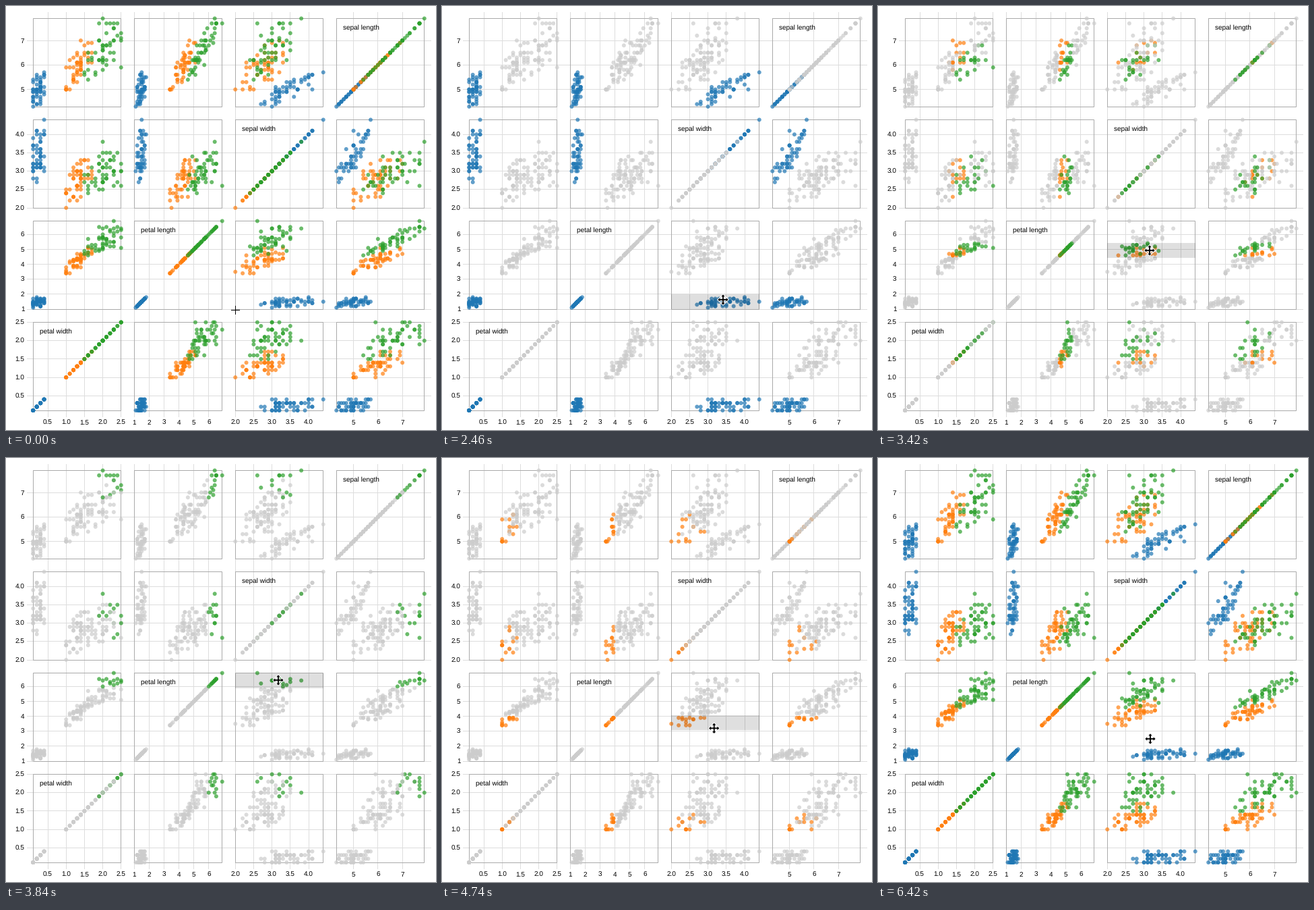
A matplotlib script that plays this animation: 638x628 px, repeating every 6.48 s.

```python
import numpy as np
import matplotlib.pyplot as plt
from matplotlib.animation import FuncAnimation
from matplotlib.patches import Polygon, Rectangle

plt.rcParams["text.hinting"] = "none"

W, H, DPI = 638, 628, 100
PX = 72 / DPI
FRAMES, STEP = 108, 60
PITCH, SIDE = 150, 130.5
LEFT, TOP = 40.25, 18.5

NAMES = ["sepal length", "sepal width", "petal length", "petal width"]
LOW = np.array([4.3, 2.0, 1.0, 0.1])
HIGH = np.array([7.9, 4.4, 6.9, 2.5])
TICK_GAP = [1, 0.5, 1, 0.5]
GREY = "#cccccc"

# colour, mean, spread, pull of overall size on each trait, two extreme flowers
SPECIES = [
    ("#1f77b4", (5.0, 3.43, 1.46, 0.25), (0.35, 0.38, 0.17, 0.10),
     (0.9, 0.82, 0.3, 0.3), [(4.3, 3.0, 1.1, 0.1), (5.7, 4.4, 1.5, 0.4)]),
    ("#ff7f0e", (5.94, 2.77, 4.26, 1.33), (0.52, 0.31, 0.47, 0.20),
     (0.75, 0.7, 0.9, 0.85), [(5.0, 2.0, 3.5, 1.0), (7.0, 3.2, 4.7, 1.4)]),
    ("#2ca02c", (6.59, 2.97, 5.55, 2.03), (0.64, 0.32, 0.55, 0.27),
     (0.9, 0.55, 0.95, 0.45), [(7.9, 3.8, 6.4, 2.0), (7.7, 2.6, 6.9, 2.3)]),
]
COUNT = 50


def flowers(rng, mean, spread, pull, extremes):
    """Traits that share one size factor, measured to 0.1."""
    pull = np.array(pull)
    n = COUNT - len(extremes)
    z = pull * rng.standard_normal((n, 1))
    z = z + np.sqrt(1 - pull ** 2) * rng.standard_normal((n, 4))
    z = np.clip((z - z.mean(0)) / z.std(0), -1.8, 1.8)
    return np.vstack([extremes, np.round(mean + spread * z, 1)])


rng = np.random.default_rng(7)
data = np.vstack([flowers(rng, *s[1:]) for s in SPECIES])


def x_pos(v, k):
    return LEFT + PITCH * (3 - k) + (v - LOW[k]) / (HIGH[k] - LOW[k]) * SIDE


def y_pos(v, k):
    return TOP + PITCH * k + (HIGH[k] - v) / (HIGH[k] - LOW[k]) * SIDE


def crisp(v):
    return np.floor(v) + 0.5


def rgba(color):
    return [int(color[i:i + 2], 16) / 255 for i in (1, 3, 5)] + [0.7]


fig = plt.figure(figsize=(W / DPI, H / DPI), dpi=DPI, facecolor="white")
ax = fig.add_axes([0, 0, 1, 1])
ax.set_xlim(0, W)
ax.set_ylim(H, 0)
ax.axis("off")
FONT = dict(family="Liberation Sans", size=10 * PX, color="black", va="baseline")
GRID = dict(color="#dddddd", lw=PX, zorder=1, solid_capstyle="butt", snap=False)

# Grid, tick labels, trait names
for k, gap in enumerate(TICK_GAP):
    first = np.ceil(LOW[k] / gap) * gap
    for v in np.arange(first, HIGH[k] + 0.01, gap):
        x, y = x_pos(v, k), y_pos(v, k)
        ax.plot([crisp(x)] * 2, [9, 609], **GRID)
        ax.plot([31, 631], [crisp(y)] * 2, **GRID)
        label = f"{v:.0f}" if gap == 1 else f"{v:.1f}"
        ax.text(x, 619.5, label, ha="center", **FONT)
        ax.text(27.5, y + 3.5, label, ha="right", **FONT)
    ax.text(LEFT + PITCH * (3 - k) + 9.75, 35 + PITCH * k, NAMES[k],
            ha="left", zorder=5, **FONT)

for row in range(4):
    for col in range(4):
        ax.add_patch(Rectangle((40.5 + PITCH * col, 18.5 + PITCH * row), 130, 131,
                               fill=False, ec="#aaaaaa", lw=PX, zorder=2,
                               snap=False))

cells = [(kx, ky) for kx in range(4) for ky in range(4)]
dots = ax.scatter(np.concatenate([x_pos(data[:, kx], kx) for kx, _ in cells]),
                  np.concatenate([y_pos(data[:, ky], ky) for _, ky in cells]),
                  s=(6 * PX) ** 2, linewidths=0, zorder=3)
full = np.repeat([rgba(s[0]) for s in SPECIES], COUNT, axis=0)

# The brush lives in the sepal width / petal length cell
bx, by = x_pos(data[:, 1], 1), y_pos(data[:, 2], 2)
B_LEFT, B_TOP = LEFT + 2 * PITCH, TOP + 2 * PITCH
B_RIGHT, B_BOTTOM = B_LEFT + SIDE, B_TOP + SIDE
DEPTH = 22
brush = ax.add_patch(Rectangle((0, 0), 1, 1, fc="black", alpha=0.125, lw=0,
                               zorder=4))

arm = np.array([(-1.4, -1.4), (-1.4, -4.2), (-3.9, -4.2),
                (0, -8.4), (3.9, -4.2), (1.4, -4.2)])
turn = np.array([[0, 1], [-1, 0]])
ARROWS = np.vstack([arm @ np.linalg.matrix_power(turn, q) for q in range(4)])
CROSS = np.array([(-6.5, 0), (6.5, 0), (np.nan, np.nan), (0, -6.5), (0, 6.5)])
mover = ax.add_patch(Polygon(ARROWS, fc="black", ec="white", lw=PX, zorder=6))
cross, = ax.plot([], [], color="black", lw=PX, zorder=6,
                 solid_capstyle="butt", snap=False)

# Pointer path: ms, x, y
PATH = np.array([
    (720, 340, 450.5), (1560, 476, 442), (1980, 473, 427), (2460, 417, 435),
    (2580, 416, 438), (3420, 403, 362), (3840, 404, 329), (4080, 405, 329),
    (4380, 405, 366), (5220, 402, 446), (5460, 402, 443), (6420, 404, 416)])
PRESS, RELEASE, GRAB, REGRAB, DROP, CLEAR = 780, 1980, 2580, 3840, 5220, 6060


def pointer(t):
    return [np.interp(t, PATH[:, 0], PATH[:, k]) for k in (1, 2)]


def extent(t):
    """Brush as left, right, top, bottom, or None while empty."""
    if t < PRESS or t >= CLEAR:
        return None
    if t < RELEASE:
        x, y = pointer(t)
        top = np.clip(y, B_TOP, B_BOTTOM)
        return (B_LEFT, min(x, B_RIGHT), top, B_BOTTOM) if top < B_BOTTOM else None
    grip = 11 if t < REGRAB else 19
    y = pointer(np.clip(t, GRAB, DROP))[1]
    top = np.clip(y - grip, B_TOP, B_BOTTOM - DEPTH)
    return B_LEFT, B_RIGHT, top, top + DEPTH


def draw(i):
    t = i * STEP
    box = extent(t)
    colors = full
    brush.set_visible(box is not None)
    if box:
        x0, x1, y0, y1 = box
        brush.set_bounds(x0, y0, x1 - x0, y1 - y0)
        inside = (bx <= x1 + 0.01) & (by >= y0 - 0.01) & (by <= y1 + 0.01)
        colors = np.where(inside[:, None], full, rgba(GREY))
    dots.set_facecolors(np.tile(colors, (len(cells), 1)))

    x, y = pointer(t)
    moving = t > RELEASE + STEP
    mover.set_visible(moving)
    cross.set_visible(not moving)
    mover.set_xy(ARROWS + (x, y))
    cross.set_data(*(CROSS + (crisp(x), crisp(y))).T)
    return dots, brush, mover, cross


anim = FuncAnimation(fig, draw, frames=FRAMES, interval=STEP, repeat=True,
                     repeat_delay=0, blit=False)
plt.show()
```
